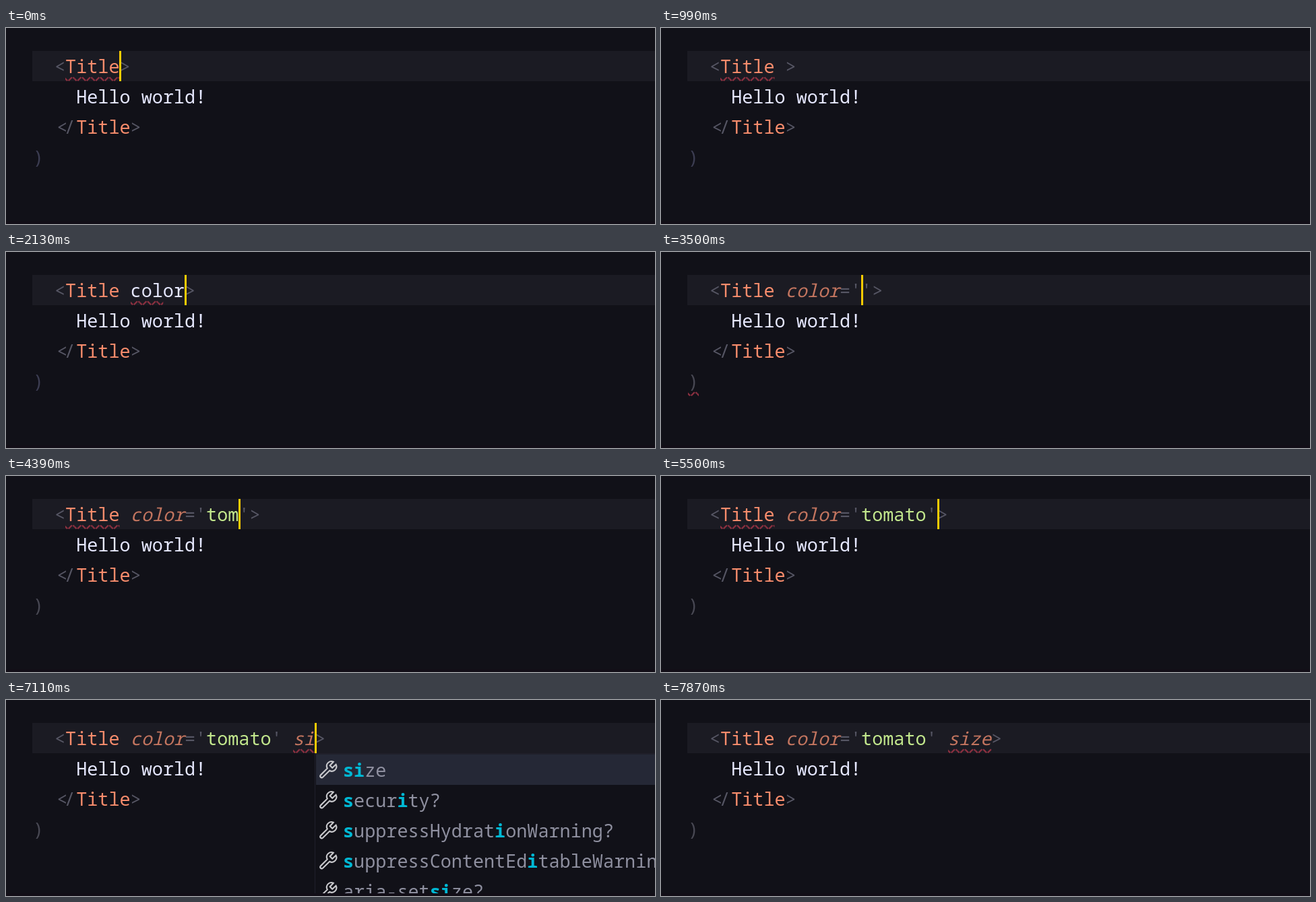
Animation, 963 px wide and 291 px high, one loop 8 s. Source, as an HTML page with a canvas:

```html
<!DOCTYPE html>
<html lang="en">
<head>
<meta charset="utf-8">
<title>Code editor</title>
<style>
html, body { margin: 0; width: 963px; height: 291px; overflow: hidden; background: #111118; }
canvas { display: block; }
</style>
</head>
<body>
<canvas id="stage" width="963" height="291"></canvas>
<script>
const ctx = document.getElementById('stage').getContext('2d');
const LOOP = 8000, W = 963, H = 291;
const LEFT = 72, CHAR = 16.08, ROW = 45, TOP = 34;
const FAMILY = '26.8px "Noto Sans Mono", "DejaVu Sans Mono", monospace';
const color = {
  bg: '#111118', line: '#1b1b23', edge: '#120e17', caret: '#ffcc00',
  tag: '#f78c6c', attr: '#c3755f', plain: '#e6e8ff', string: '#c3e88d',
  punct: '#565664', parenDim: '#3c3d52', parenGray: '#484853', wave: '#8c3040',
  menuLine: '#20202b', selected: '#252836', item: '#8f90a0', match: '#00b8d4',
  icon: '#c8c8cc', hint: '#626270'
};
const wrench = new Path2D('M1.7 12.5 L7.2 7 A3.7 3.7 0 0 1 12 1.8 L9.3 4.7 L11.2 6.6 ' +
  'L14.1 3.9 A3.7 3.7 0 0 1 9 8.8 L3.5 14.2 A1.25 1.25 0 0 1 1.7 12.5Z');
const waveTile = new Path2D('M5.5 0L2.5 3H1.1L4.1 0ZM4 0L6 2V.6L5.4 0ZM0 2L1 3H2.4L0 .6Z');

// Asterisks enclose the matched letters.
const menus = {
  co: ['*co*lor', '*co*ntentEditable?', '*co*ntextMenu?', '*c*t*o*r', 'on*Co*mpositionEnd?'],
  col: ['*col*or', '*co*ntentEditab*l*e?', 'aria-*col*count?', 'aria-*col*index?', 'aria-*col*span?'],
  s: ['*s*ize', '*s*ecurity?', '*s*lot?', '*s*pellCheck?', '*s*tyle?'],
  si: ['*si*ze', '*s*ecur*i*ty?', '*s*uppressHydrat*i*onWarning?',
    '*s*uppressContentEd*i*tableWarning?', 'aria-set*si*ze?']
};

// Each step changes only the listed fields; wave is [row, column, length].
const TITLE = [0, 1, 5];
const steps = [
  [0, { name: '', value: '', name2: '', caret: 6, on: true, wave: TITLE, menu: null, white: false, gray: false }],
  [370, { on: false }],
  [490, { name: ' ', caret: 7, on: true }],
  [990, { on: false }],
  [1120, { name: ' c', caret: 8, on: true }],
  [1240, { name: ' co', caret: 9, menu: 'co' }],
  [1490, { name: ' col', caret: 10, menu: 'col' }],
  [1860, { wave: [0, 7, 3] }],
  [2130, { name: ' color', caret: 12, menu: null, white: true }],
  [2250, { white: false }],
  [2630, { on: false, wave: [0, 7, 5] }],
  [3130, { value: '=', caret: 13, on: true, gray: true }],
  [3500, { value: "=''", caret: 14, wave: [3, -2, 1] }],
  [3880, { value: "='t'", caret: 15 }],
  [4130, { value: "='to'", caret: 16 }],
  [4260, { wave: TITLE }],
  [4390, { value: "='tom'", caret: 17 }],
  [4620, { value: "='toma'", caret: 18 }],
  [5000, { value: "='tomat'", caret: 19 }],
  [5120, { value: "='tomato'", caret: 20 }],
  [5500, { caret: 21 }],
  [5870, { name2: ' ', caret: 22 }],
  [6380, { on: false }],
  [6500, { name2: ' s', caret: 23, on: true, menu: 's' }],
  [6750, { name2: ' si', caret: 24, menu: 'si' }],
  [7110, { wave: [0, 22, 2] }],
  [7360, { name2: ' size', caret: 26, menu: null }],
  [7740, { wave: [0, 22, 4] }],
  [7870, { on: false }]
];

const stateAt = t => Object.assign({}, ...steps.filter(s => s[0] <= t).map(s => s[1]));
const colX = col => LEFT + col * CHAR;

function rect(x, y, w, h, fill) {
  ctx.fillStyle = fill;
  ctx.fillRect(x, y, w, h);
}

function text(str, x, y, fill, style = '') {
  ctx.font = style + ' ' + FAMILY;
  ctx.fillStyle = fill;
  ctx.fillText(str, x, y);
  return x + str.length * CHAR;
}

function code(str, col, row, fill, style) {
  text(str, colX(col), TOP + row * ROW + 32.5, fill, style);
  return col + str.length;
}

function drawWave([row, col, len]) {
  const x = Math.round(colX(col)), w = len * CHAR, scale = 2.25;
  const y = TOP + (row + 1) * ROW - 3 * scale;
  ctx.save();
  ctx.beginPath();
  ctx.rect(x, y, w, 7);
  ctx.clip();
  ctx.fillStyle = color.wave;
  ctx.translate(x, y);
  ctx.scale(scale, scale);
  for (let i = 0; i * 6 * scale < w; i++) {
    ctx.fill(waveTile);
    ctx.translate(6, 0);
  }
  ctx.restore();
}

function drawTagLine(s) {
  let col = code('<', 0, 0, color.punct);
  col = code('Title', col, 0, color.tag);
  const style = s.white ? '' : 'italic';
  col = code(s.name, col, 0, s.white ? color.plain : color.attr, style);
  for (const part of s.value.split(/(['=])/)) {
    col = code(part, col, 0, /['=]/.test(part) ? color.punct : color.string);
  }
  col = code(s.name2, col, 0, color.attr, 'italic');
  code('>', col, 0, color.punct);
}

function drawIcon(x, y, isCtor) {
  ctx.save();
  ctx.strokeStyle = color.icon;
  if (isCtor) {
    ctx.lineWidth = 2;
    ctx.beginPath();
    ctx.moveTo(x + 10, y + 30);
    ctx.lineTo(x + 10, y + 11);
    ctx.lineTo(x + 32, y + 11);
    ctx.lineTo(x + 32, y + 30);
    ctx.stroke();
    for (let i = 0; i < 6; i++) rect(x + 9 + i * 4.4, y + 32, 2.4, 2, color.icon);
  } else {
    ctx.translate(x + 5.5, y + 7.5);
    ctx.scale(1.85, 1.85);
    ctx.lineWidth = 1.15;
    ctx.stroke(wrench);
  }
  ctx.restore();
}

function drawMenu(items, x) {
  rect(x, 79, W - x, H - 79, color.menuLine);
  rect(x + 1, 81, W - x, H - 81, color.bg);
  rect(x + 2, 81, W - x, ROW, color.selected);
  items.forEach((item, i) => {
    const y = 81 + i * ROW, isCtor = item === '*c*t*o*r';
    drawIcon(x, y, isCtor);
    let tx = x + 42;
    item.split('*').forEach((part, n) => {
      tx = text(part, tx, y + 32.5, n % 2 ? color.match : color.item, n % 2 ? 'bold' : '');
    });
    if (isCtor) text('Constructor', 797, y + 32.5, color.hint);
  });
}

function draw(t) {
  const s = stateAt(t);
  rect(0, 0, W, H, color.bg);
  rect(39, TOP, W - 39, ROW, color.line);
  drawTagLine(s);
  code('Hello world!', 2, 1, color.plain);
  // The closing tag's opener is set as a tight pair.
  code('<', 0.2, 2, color.punct);
  code('/', 0.9, 2, color.punct);
  code('Title', 2, 2, color.tag);
  code('>', 7, 2, color.punct);
  code(')', -2, 3, s.gray ? color.parenGray : color.parenDim);
  drawWave(s.wave);
  const x = Math.round(colX(s.caret));
  if (s.menu) drawMenu(menus[s.menu], x);
  if (s.on) rect(x, TOP, 3, ROW, color.caret);
  rect(0, 287, W, 4, color.edge);
}

const start = performance.now();
function tick() {
  draw((performance.now() - start) % LOOP);
  requestAnimationFrame(tick);
}
tick();
</script>
</body>
</html>
```
